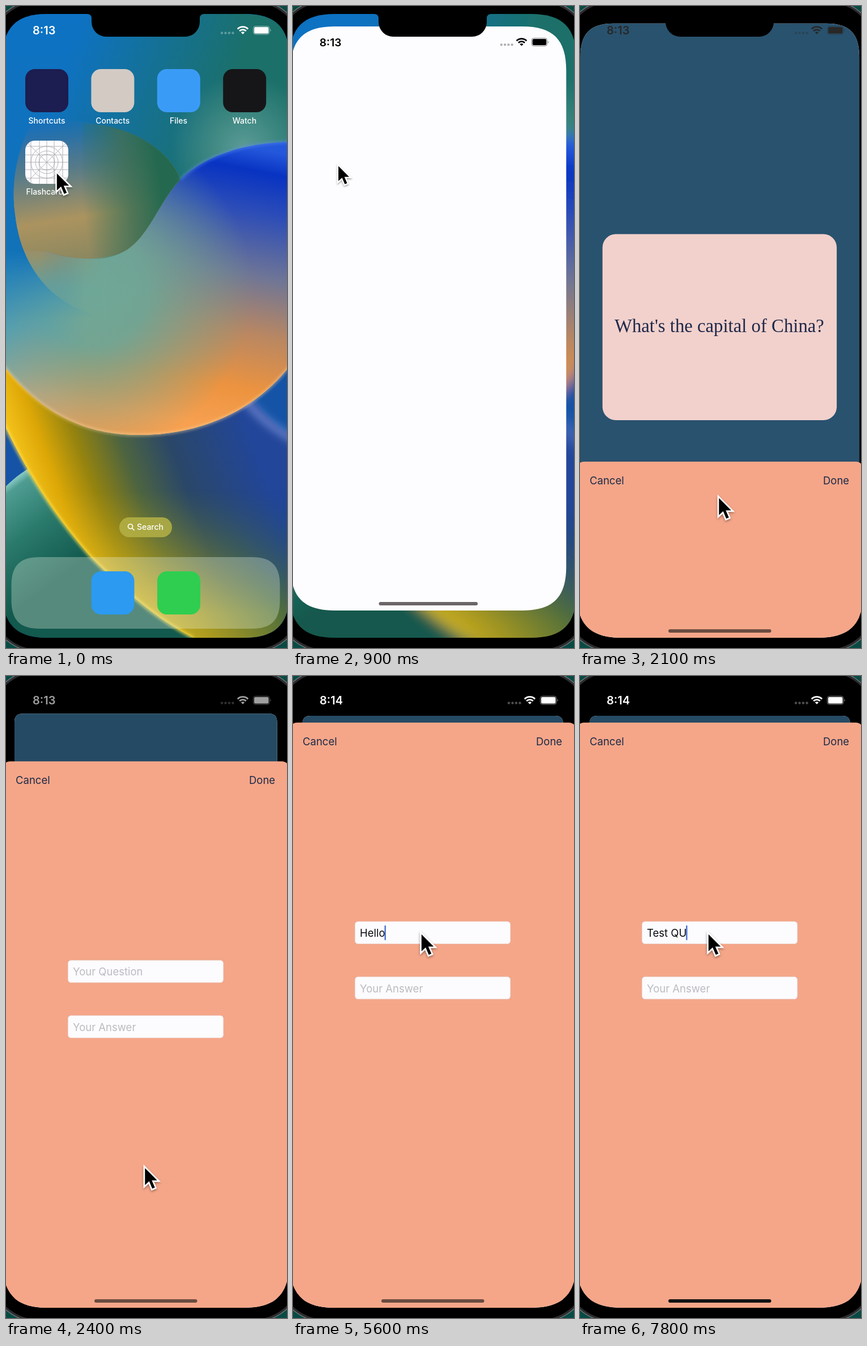
These frames come from a looping animation (496 by 1130 pixels, 8000 ms). An HTML page:

```html
<!DOCTYPE html>
<html lang="en">
<head>
<meta charset="utf-8">
<title>Flashcards</title>
<style>
  html, body { margin: 0; width: 100%; height: 100%; overflow: hidden; background: #084b44; }
  svg { display: block; width: 100%; height: 100%; }
  text { font-family: Inter, "Noto Sans", sans-serif; white-space: pre; }
  .label { font-size: 14px; font-weight: 500; fill: #fff; }
  .ui { font-size: 18.5px; }
  .mid { text-anchor: middle; }
</style>
</head>
<body>
<svg viewBox="0 0 496 1130" preserveAspectRatio="none">
  <defs>
    <clipPath id="screenClip"><path id="screenShape"/></clipPath>
    <clipPath id="winClip"><path id="winShape"/></clipPath>
    <clipPath id="lobeClip"><path d="M60 180C20 240 8 310 16 365C26 460 80 520 150 542H520V180Z"/></clipPath>
    <filter id="soft" x="-20%" y="-20%" width="140%" height="140%"><feGaussianBlur stdDeviation="2.5"/></filter>
    <filter id="softer" x="-40%" y="-40%" width="180%" height="180%"><feGaussianBlur stdDeviation="7"/></filter>
    <filter id="blur" x="-5%" y="-5%" width="110%" height="110%"><feGaussianBlur id="blurAmount" stdDeviation="0"/></filter>
    <filter id="shadow" x="-50%" y="-50%" width="200%" height="200%">
      <feDropShadow dx="0" dy="2" stdDeviation="2" flood-opacity=".4"/>
    </filter>

    <linearGradient id="sky" gradientUnits="userSpaceOnUse" x1="0" y1="0" x2="0" y2="755">
      <stop offset="0" stop-color="#0d72c4"/><stop offset=".57" stop-color="#1272b8"/>
      <stop offset=".75" stop-color="#46a0bc"/><stop offset=".85" stop-color="#78a8a6"/>
      <stop offset="1" stop-color="#e8b080"/>
    </linearGradient>
    <linearGradient id="skyRight" gradientUnits="userSpaceOnUse" x1="120" y1="60" x2="400" y2="150">
      <stop offset="0" stop-color="#1b7069" stop-opacity="0"/><stop offset="1" stop-color="#1b7069"/>
    </linearGradient>
    <radialGradient id="haze" gradientUnits="userSpaceOnUse" cx="420" cy="250" r="130">
      <stop offset="0" stop-color="#86b8b4" stop-opacity=".6"/><stop offset="1" stop-color="#86b8b4" stop-opacity="0"/>
    </radialGradient>
    <linearGradient id="disc" gradientUnits="userSpaceOnUse" x1="440" y1="250" x2="345" y2="735">
      <stop offset="0" stop-color="#2458dc"/><stop offset=".08" stop-color="#0833c2"/>
      <stop offset=".22" stop-color="#2b4cb8"/><stop offset=".45" stop-color="#707695"/>
      <stop offset=".65" stop-color="#b98762"/><stop offset=".85" stop-color="#ec933f"/>
      <stop offset="1" stop-color="#f6a050"/>
    </linearGradient>
    <radialGradient id="teal" gradientUnits="userSpaceOnUse" cx="150" cy="500" r="285">
      <stop offset="0" stop-color="#6fa898"/><stop offset=".35" stop-color="#6fa595" stop-opacity=".95"/>
      <stop offset="1" stop-color="#6fa090" stop-opacity="0"/>
    </radialGradient>
    <linearGradient id="fadeRight" gradientUnits="userSpaceOnUse" x1="-10" y1="0" x2="140" y2="0">
      <stop offset="0" stop-color="#fff" stop-opacity=".1"/><stop offset="1" stop-color="#fff"/>
    </linearGradient>
    <mask id="discMask" maskUnits="userSpaceOnUse" x="-20" y="0" width="540" height="800"><rect x="-20" width="540" height="800" fill="url(#fadeRight)"/></mask>
    <linearGradient id="fadeDown" gradientUnits="userSpaceOnUse" x1="0" y1="440" x2="0" y2="550">
      <stop offset="0" stop-color="#fff"/><stop offset="1" stop-color="#fff" stop-opacity="0"/>
    </linearGradient>
    <mask id="outsideMask" maskUnits="userSpaceOnUse" x="-20" y="0" width="540" height="800"><rect x="-20" width="540" height="800" fill="url(#fadeDown)"/></mask>
    <linearGradient id="blob" gradientUnits="userSpaceOnUse" x1="90" y1="195" x2="130" y2="450">
      <stop offset="0" stop-color="#1f6cb0" stop-opacity="0"/><stop offset=".35" stop-color="#547a8a"/>
      <stop offset=".7" stop-color="#ab935f"/><stop offset="1" stop-color="#8a8760"/>
    </linearGradient>
    <linearGradient id="blobEdge" gradientUnits="userSpaceOnUse" x1="135" y1="350" x2="275" y2="330">
      <stop offset="0" stop-color="#2c7158" stop-opacity="0"/><stop offset=".6" stop-color="#3a6e54" stop-opacity=".8"/>
      <stop offset="1" stop-color="#24694f"/>
    </linearGradient>
    <linearGradient id="lobe" gradientUnits="userSpaceOnUse" x1="0" y1="190" x2="0" y2="540">
      <stop offset="0" stop-color="#3a6cae" stop-opacity="0"/><stop offset=".3" stop-color="#4a74a0" stop-opacity=".8"/>
      <stop offset=".62" stop-color="#a38b64"/><stop offset=".72" stop-color="#94926e"/>
      <stop offset=".86" stop-color="#6f9f94" stop-opacity=".8"/><stop offset="1" stop-color="#6fa698" stop-opacity="0"/>
    </linearGradient>
    <linearGradient id="fadeLeft" gradientUnits="userSpaceOnUse" x1="60" y1="0" x2="170" y2="0">
      <stop offset="0" stop-color="#fff"/><stop offset="1" stop-color="#fff" stop-opacity="0"/>
    </linearGradient>
    <mask id="lobeMask" maskUnits="userSpaceOnUse" x="-20" y="0" width="540" height="800"><rect x="-20" width="540" height="800" fill="url(#fadeLeft)"/></mask>
    <linearGradient id="band" gradientUnits="userSpaceOnUse" x1="45" y1="860" x2="420" y2="720">
      <stop offset="0" stop-color="#f5c21c"/><stop offset=".12" stop-color="#dda806"/>
      <stop offset=".27" stop-color="#94830f"/><stop offset=".45" stop-color="#4d6440"/>
      <stop offset=".65" stop-color="#2a4768"/><stop offset="1" stop-color="#22469a"/>
    </linearGradient>
    <linearGradient id="bandLow" gradientUnits="userSpaceOnUse" x1="200" y1="1060" x2="490" y2="860">
      <stop offset="0" stop-color="#e8bd1c"/><stop offset=".3" stop-color="#aa9a20"/>
      <stop offset=".65" stop-color="#52703a"/><stop offset="1" stop-color="#1a477c"/>
    </linearGradient>
    <linearGradient id="lowFade" x1="0" y1="0" x2="0" y2="1">
      <stop offset=".1" stop-color="#000"/><stop offset=".8" stop-color="#fff"/>
    </linearGradient>
    <mask id="lowMask" maskUnits="userSpaceOnUse" x="-20" y="820" width="540" height="310"><rect x="-20" y="820" width="540" height="310" fill="url(#lowFade)"/></mask>
    <linearGradient id="green" gradientUnits="userSpaceOnUse" x1="15" y1="825" x2="130" y2="980">
      <stop offset="0" stop-color="#a0dcd8"/><stop offset=".1" stop-color="#4f9d92"/>
      <stop offset=".5" stop-color="#2a7a6c"/><stop offset="1" stop-color="#12594e"/>
    </linearGradient>

    <g id="status" fill="currentColor">
      <text id="clock" x="47" y="50" font-size="20" font-weight="600"></text>
      <g opacity=".3"><circle cx="381" cy="47.5" r="2.2"/><circle cx="387.5" cy="47.5" r="2.2"/><circle cx="394" cy="47.5" r="2.2"/><circle cx="400.5" cy="47.5" r="2.2"/></g>
      <path d="M408.8 40.4a13.2 13.2 0 0 1 18.4 0M412.2 44a8.200 8.200 0 0 1 11.6 0" fill="none" stroke="currentColor" stroke-width="2.8"/>
      <path d="M418 49.8l-3.2-3.3a4.500 4.500 0 0 1 6.4 0z"/>
      <rect x="436.500" y="35.500" width="28.500" height="14.500" rx="4" fill="none" stroke="currentColor" opacity=".5"/>
      <rect x="438" y="37" width="25.500" height="11.500" rx="2.500"/>
      <path d="M466.500 40.500q2.500 2.200 0 4.500z" opacity=".5"/>
    </g>
  </defs>

  <rect width="496" height="1130" fill="#084b44"/>
  <rect x="-31" y="-11" width="556" height="1148" rx="89" stroke="#77797b" stroke-width="1.5"/>
  <rect x="-28.5" y="-8.5" width="551" height="1143" rx="86.5" stroke="#2d2d30" stroke-width="3.5"/>

  <g clip-path="url(#screenClip)">
    <rect width="496" height="1130"/>
    <g id="wall">
      <rect x="-20" width="540" height="1130" fill="#1553a6"/>
      <path d="M-20 1130V868C0 842 25 820 60 803L420 1130Z" fill="url(#green)"/>
      <path d="M-20 600V700C20 790 70 880 150 970C210 1030 260 1075 330 1112L350 1130H520V765C480 745 455 720 425 680Z" fill="url(#band)"/>
      <path d="M50 830C80 880 110 925 150 970C210 1030 260 1075 330 1112L350 1130H520V820Z" fill="url(#bandLow)" mask="url(#lowMask)"/>
      <path d="M-20 700C20 790 70 880 150 970C210 1030 260 1075 330 1112" fill="none" stroke="#ffe04a" stroke-width="5" stroke-opacity=".8" filter="url(#soft)"/>
      <path d="M420 690C450 728 480 748 520 770" fill="none" stroke="#7f94da" stroke-width="16" stroke-opacity=".6" filter="url(#softer)"/>
      <path d="M-20-10H520V605C470 690 370 755 235 755C130 755 50 710 -20 612Z" fill="url(#sky)"/>
      <path d="M-20-10H520V330H-20Z" fill="url(#skyRight)"/>
      <path d="M280 100H520V330H280Z" fill="url(#haze)"/>
      <g mask="url(#discMask)">
        <path d="M520 239C420 238 350 265 308 305C270 345 255 400 215 428C180 450 120 448 70 433H-20V612C50 710 130 755 235 755C370 755 470 690 520 605Z" fill="url(#disc)"/>
        <path d="M520 239C420 238 350 265 308 305C270 345 255 400 215 428C180 450 120 448 70 433H-20V612C50 710 130 755 235 755C370 755 470 690 520 605Z" fill="url(#teal)"/>
      </g>
      <path d="M-20 180H60C20 240 8 310 16 365C26 460 80 520 150 542V560H-20Z" fill="url(#sky)" mask="url(#outsideMask)"/>
      <g clip-path="url(#lobeClip)">
        <path d="M0 180H170V222C260 240 295 270 308 305C270 345 255 400 215 428L180 545H0Z" fill="url(#lobe)" mask="url(#lobeMask)"/>
        <path id="blobShape" d="M0 200C110 195 170 208 215 222C260 240 295 270 308 305C270 345 255 400 215 428C180 450 120 448 75 433C50 430 30 430 0 430Z" fill="url(#blob)"/>
        <use href="#blobShape" style="fill:url(#blobEdge)"/>
        <path d="M135 206C170 208 195 214 215 222C260 240 295 270 308 305C270 345 255 400 215 428C180 450 150 446 135 445Z" fill="url(#blobEdge)"/>
      </g>
      <path d="M-20 612C50 710 130 755 235 755C370 755 470 690 520 605" fill="none" stroke="#ffd9a0" stroke-width="3" stroke-opacity=".7" filter="url(#soft)"/>
      <path d="M520 239C420 238 350 265 308 305" fill="none" stroke="#5b8cf0" stroke-width="4" stroke-opacity=".6" filter="url(#soft)"/>
    </g>

    <g id="home">
      <g id="tiles"></g>
      <path id="dockPanel" fill="#e6f2e0" fill-opacity=".32"/>
      <g id="dock"></g>
      <g fill="none" stroke="#a3a3a8" stroke-width=".8">
        <rect x="34" y="237" width="76" height="76" rx="17" fill="#fdfcff" stroke="none"/>
        <path d="M34 247H110M34 262H110M34 275H110M34 288H110M34 303H110M44 237V313M59 237V313M72 237V313M85 237V313M100 237V313M38 241L106 309M106 241L38 309"/>
        <circle cx="72" cy="275" r="28"/><circle cx="72" cy="275" r="20"/><circle cx="72" cy="275" r="14"/>
      </g>
      <text class="label mid" x="72" y="332">Flashcards</text>
      <rect x="200" y="900" width="93" height="35" rx="17.5" fill="#b5b246" fill-opacity=".85"/>
      <g fill="none" stroke="#fff" stroke-width="1.7"><circle cx="219.5" cy="916" r="4"/><path d="M222.500 919l4 4"/></g>
      <text class="label" x="231" y="922">Search</text>
      <use href="#status" color="#fff"/>
    </g>

    <rect id="backdrop" width="496" height="1130"/>
    <g id="win" clip-path="url(#winClip)">
      <rect x="-10" width="520" height="1130" fill="#fdfcff"/>
      <g id="app">
        <rect x="-10" y="10" width="520" height="1110" fill="#2b5673"/>
        <rect x="34" y="395" width="425" height="336.5" rx="24" fill="#fddad5"/>
        <text x="246" y="572" class="mid" font-size="33.7" fill="#1f2a4d" style="font-family:'Liberation Serif',serif">What's the capital of China?</text>
        <rect x="208.5" y="831" width="77.5" height="84" rx="7" fill="#006fff"/>
        <path d="M241.8 875H252.8M247.3 869.5V880.5" stroke="#fff" stroke-width="1.7"/>
        <g class="mid" fill="#3a5064">
          <rect x="23" y="1026" width="79" height="45" rx="8" fill="#305f75"/>
          <rect x="398" y="1026" width="79" height="45" rx="8" fill="#305f75"/>
          <text class="ui" x="61" y="1056">Prev</text><text class="ui" x="437" y="1056">Next</text>
        </g>
      </g>
      <rect id="dim" x="-10" width="520" height="1130"/>
    </g>

    <g id="sheet">
      <rect x="-6" y="82" width="506" height="1100" rx="13" fill="#f5a689"/>
      <g fill="#1b2a47"><text class="ui" x="17" y="121.5">Cancel</text><text class="ui" x="429" y="121.5">Done</text></g>
      <g fill="#fcfbfe" stroke="#e3c4bb" stroke-width=".6">
        <rect x="109.3" y="432" width="274.5" height="39.5" rx="5.5"/><rect x="109.3" y="529.3" width="274.5" height="39.5" rx="5.5"/>
      </g>
      <text id="entry" class="ui" x="118" y="459"></text>
      <text class="ui" x="118" y="556.5" fill="#bcbbc0">Your Answer</text>
      <rect id="caret" y="439" width="2.2" height="26" rx="1" fill="#3a66cc"/>
    </g>
    <use id="topStatus" href="#status"/>
    <rect id="bar" height="6" rx="3"/>
  </g>
  <path d="M143 0V14Q151 14 151 22V28A26 26 0 0 0 177 54H316A26 26 0 0 0 342 28V22Q342 14 350 14V0Z"/>

  <path id="pointer" d="M0 0V36L8.2 28.5L13.5 41L20.500 38L15.3 26H26Z" stroke="#fff" stroke-width="2.6" filter="url(#shadow)"/>
</svg>
<script>
const LOOP = 8000, STEP = 100;
const $ = id => document.getElementById(id);
const set = (id, attrs) => { for (const k in attrs) $(id).setAttribute(k, attrs[k]); };
const clamp = v => Math.max(0, Math.min(1, v));
const mix = (a, b, p) => a + (b - a) * p;
const ramp = (t, a, b) => clamp((t - a) / (b - a));
const smooth = p => p * p * (3 - 2 * p);
// Critically damped spring from 0 to 1; s in seconds.
const spring = (s, w) => s <= 0 ? 0 : 1 - (1 + w * s) * Math.exp(-w * s);
const gray = v => `rgb(${v},${v},${v})`;

const FULL = { x: -6, y: 14, w: 506, h: 1098 };
// Time, x, y and scale of the pointer.
const MOVES = [[0, 88.5, 291.5, 1], [400, 79, 279, .88], [950, 79, 279, .88], [1300, 166, 317, 1], [1750, 244, 863, 1],
  [2450, 244, 863, 1], [3300, 225.5, 451.5, 1]];
const TYPING = [[0, ""], [4000, "H"], [4100, "He"], [4300, "Hel"], [4400, "Hell"], [4500, "Hello"], [4800, "Hello "],
  [5600, "Hello"], [5700, "Hell"], [5800, "Hel"], [5900, "He"], [6000, "H"], [6100, ""], [6300, "T"],
  [6500, "Te"], [6600, "Tes"], [6800, "Test"], [7000, "Test "], [7700, "Test Q"], [7800, "Test QU"]];

function squircle({ x, y, w, h }, r) {
  const c = r * .7, k = r - c;
  return `M${x + r} ${y}h${w - 2 * r}c${c} 0 ${r} ${k} ${r} ${r}v${h - 2 * r}c0 ${c} ${-k} ${r} ${-r} ${r}` +
    `h${2 * r - w}c${-c} 0 ${-r} ${-k} ${-r} ${-r}v${2 * r - h}c0 ${-c} ${k} ${-r} ${r} ${-r}z`;
}

const tile = (x, y, fill) => `<rect x="${x}" y="${y}" width="76" height="76" rx="17" fill="${fill}"/>`;
$("tiles").innerHTML = [["Shortcuts", "#1c1d50"], ["Contacts", "#d3cac4"], ["Files", "#3a9bf7"], ["Watch", "#161618"]]
  .map(([name, fill], i) => tile(34 + i * 116.4, 111, fill) +
    `<text class="label mid" x="${72 + i * 116.3}" y="207">${name}</text>`).join("");
$("dock").innerHTML = tile(150.5, 995, "#2b9af0") + tile(267, 995, "#2fce50");
set("screenShape", { d: squircle(FULL, 80) });
set("dockPanel", { d: squircle({ x: 9.5, y: 970, w: 474, h: 126 }, 50) });

function movePointer(t) {
  const i = MOVES.findLastIndex(m => m[0] <= t);
  const a = MOVES[i], b = MOVES[i + 1] || a;
  const p = a === b ? 0 : smooth(ramp(t, a[0], b[0]));
  const [x, y, size] = [1, 2, 3].map(n => mix(a[n], b[n], p));
  set("pointer", { transform: `translate(${x} ${y}) scale(${size})` });
}

function drawField(t) {
  const value = TYPING.findLast(k => k[0] <= t)[1];
  const entry = $("entry");
  entry.textContent = value || "Your Question";
  entry.setAttribute("fill", value ? "#0b0b10" : "#bcbbc0");
  const width = value ? entry.getComputedTextLength() : 0;
  const blink = t === 5300 ? .4 : t === 5400 || t === 5500 ? 0 : 1;
  set("caret", { x: 117 + width, opacity: t < 3400 ? 0 : blink });
}

function draw(t) {
  const s = (t - 500) / 1000;
  const open = t >= 1200 ? 1 : spring(s, 12.15);
  const tall = t >= 1200 ? 1 : spring(s, 10.9);
  const up = t >= 2900 ? 1 : spring((t - 2000) / 1000, 11);

  const w = mix(76, FULL.w, open), h = mix(76, FULL.h, tall);
  const box = { x: mix(72, 247, open) - w / 2, y: mix(275, 563, open) - h / 2, w, h };
  const k = w / FULL.w;
  const place = `translate(${box.x - FULL.x * k} ${box.y - FULL.y * k}) scale(${k})`;
  const zoom = v => `translate(247 563) scale(${v}) translate(-247 -563)`;
  const display = t < 1200 ? "inline" : "none";

  $("clock").textContent = t < 4700 ? "8:13" : "8:14";
  set("wall", { transform: zoom(1 + .03 * open), display });
  if (open > 0) set("wall", { filter: "url(#blur)" }); else $("wall").removeAttribute("filter");
  set("blurAmount", { stdDeviation: 12 * open });
  set("home", { opacity: 1 - clamp(open * 1.15), transform: zoom(1 + .12 * open), display });

  const card = up > 0 ? { x: mix(FULL.x, 16.5, up), y: mix(14, 70, up), w: mix(506, 460.5, up), h: 1098 } : box;
  const ck = card.w / FULL.w;
  const radius = up > 0 ? mix(80, 15, clamp(up * 1.1)) : mix(20, 80, open);
  set("winShape", { d: squircle(card, radius) });
  set("win", { opacity: ramp(open, 0, .3) });
  set("app", { opacity: ramp(t, 1000, 1200), transform: `translate(${card.x - FULL.x * ck} ${card.y - 14 * ck}) scale(${ck})` });
  set("backdrop", { opacity: up });
  set("dim", { opacity: .14 * up });

  set("sheet", { transform: `translate(0 ${1030 * (1 - up)})`, display: up > 0 ? "inline" : "none" });
  const tone = Math.round(255 * ramp(t, 2000, 2640));
  set("topStatus", { color: gray(tone), transform: place, opacity: ramp(open, .5, .9) });

  const late = ramp(t, 5600, 6300);
  const barFill = t < 1200 ? "#6b6568" : t < 2100 ? "#3c4a58"
    : `rgb(${mix(106, 17, late)},${mix(76, 17, late)},${mix(64, 20, late)})`;
  set("bar", { x: box.x + 162 * k, y: box.y + box.h - 15, width: 181.5 * k, fill: barFill, opacity: ramp(open, .5, .9) });

  drawField(t);
  movePointer(t);
}

function tick(now) {
  draw(Math.floor(now % LOOP / STEP) * STEP);
  requestAnimationFrame(tick);
}
draw(0);
requestAnimationFrame(tick);
</script>
</body>
</html>
```
